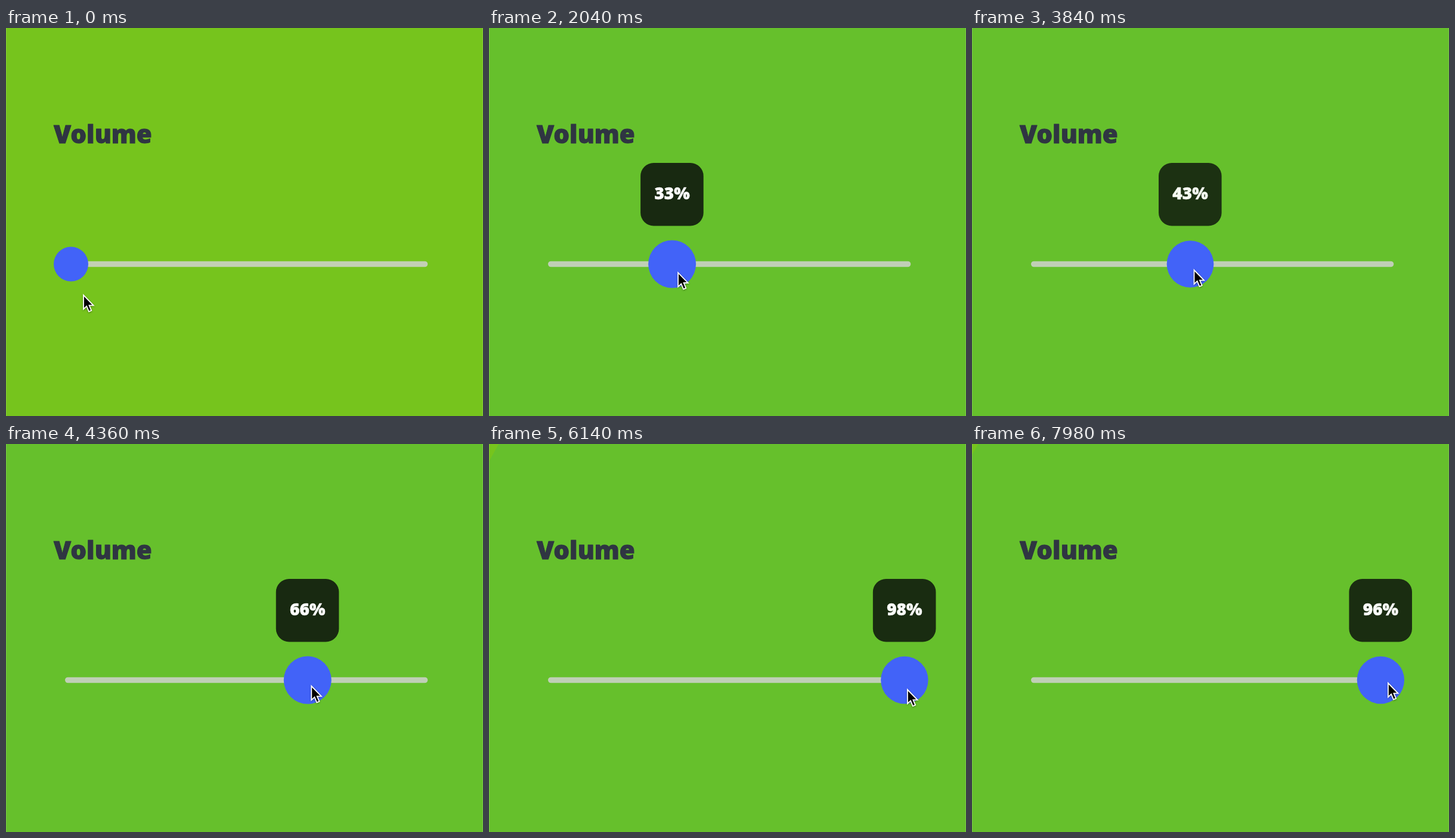
An HTML page for the animation above (8 s loop, 800 by 650 pixels).

```html
<!DOCTYPE html>
<html lang="en">
<head>
<meta charset="utf-8">
<title>Volume slider</title>
<style>
  html, body { margin: 0; width: 100%; height: 100%; overflow: hidden; background: #76c41d; }
  svg { display: block; width: 800px; height: 650px; }
  text { font-family: "Open Sans", "Noto Sans", sans-serif; font-weight: 800; stroke-linejoin: round; }
  .title { font-size: 42px; fill: #2f3542; stroke: #2f3542; stroke-width: 1px; }
  .value { font-size: 28px; fill: #fff; stroke: #fff; stroke-width: .5px; text-anchor: middle; }
  #cursor { filter: drop-shadow(0 1.5px 1.5px rgba(0, 0, 0, .35)); }
</style>
</head>
<body>
<svg viewBox="0 0 800 650">
  <rect width="800" height="650" fill="#76c41d"/>
  <circle id="ripple" cy="395.5" fill="#66c02c"/>
  <path d="M.5 0V650M799.5 0V650" stroke="#fff" stroke-opacity=".13"/>
  <text class="title" x="80" y="192.5">Volume</text>
  <rect x="99" y="390.7" width="608.3" height="9.6" rx="4.8" fill="#d3d3d3" fill-opacity=".83"/>
  <circle id="thumb" cy="395.5" fill="#4263f8"/>
  <g id="badge">
    <rect x="-53" y="226" width="105.6" height="105.4" rx="22" fill="#182911"/>
    <text class="value" id="value" y="287"></text>
  </g>
  <path id="cursor" d="M0 0V23.5L5.2 18.6L9 27.6L13.2 25.8L9.5 17.1H16.6Z"
        fill="#000" stroke="#fff" stroke-width="1.8"/>
</svg>
<script>
  const LOOP = 8000, FADE = 500, MIN_X = 109, MAX_X = 707;

  // Each move: start, end, value reached
  const drags = [[830, 2790, 341], [3770, 5050, 573], [5880, 6240, MAX_X], [7750, 8600, 661]];
  // Cursor position relative to the thumb
  const offsets = [
    [0, 450, [10, 16]], [1220, 2800, [10, 13]], [3300, 3500, [6.5, 10]],
    [4400, 5400, [5, 16]], [6240, 6660, [53, 17]], [6660, 7500, [12.5, 5]]
  ];
  const presses = [[617, 2812], [3500, 5060], [5750, 6280], [7600, LOOP]];

  const $ = id => document.getElementById(id);
  const [ripple, thumb, badge, value, cursor] =
    ["ripple", "thumb", "badge", "value", "cursor"].map($);

  const easeOut = u => 1 - (1 - u) ** 2;
  const easeInOut = u => u < .5 ? 2 * u * u : 1 - 2 * (1 - u) ** 2;
  const mix = (a, b, u) => a + (b - a) * u;
  const progress = (t, start, end) => Math.min(1, Math.max(0, (t - start) / (end - start)));

  const glide = (t, from, moves, ease) => moves.reduce(
    (v, [start, end, to]) => mix(v, to, ease(progress(t, start, end))), from);

  const bezier = (s, a, b) => 3 * (1 - s) ** 2 * s * a + 3 * (1 - s) * s * s * b + s ** 3;

  // CSS "ease" timing curve
  function cssEase(u) {
    let lo = 0, hi = 1;
    for (let i = 0; i < 24; i++) {
      const mid = (lo + hi) / 2;
      if (bezier(mid, .25, .25) < u) lo = mid; else hi = mid;
    }
    return bezier(lo, .1, 1);
  }

  const fade = (t, start) => cssEase(progress(t, start, start + FADE));
  const pressAt = t => presses.reduce(
    (sum, [down, up]) => sum + fade(t, down) - fade(t, up), 0);

  function draw(t) {
    const x = glide(t, MIN_X, drags, easeOut);
    const [dx, dy] = [21, 52].map((from, axis) =>
      glide(t, from, offsets.map(([start, end, to]) => [start, end, to[axis]]), easeInOut));
    const press = Math.max(0, pressAt(t));
    const glow = press ** .85;
    thumb.setAttribute("cx", x);
    thumb.setAttribute("r", 29 + 11 * glow);
    ripple.setAttribute("cx", x);
    ripple.setAttribute("r", 29 + 781 * press);
    badge.setAttribute("transform", `translate(${x})`);
    badge.setAttribute("opacity", glow);
    value.textContent = Math.round((x - MIN_X) / (MAX_X - MIN_X) * 100) + "%";
    cursor.setAttribute("transform", `translate(${x + dx} ${395.5 + dy})`);
  }

  const begin = performance.now();
  function tick() {
    draw((performance.now() - begin) % LOOP);
    requestAnimationFrame(tick);
  }
  tick();
</script>
</body>
</html>
```
